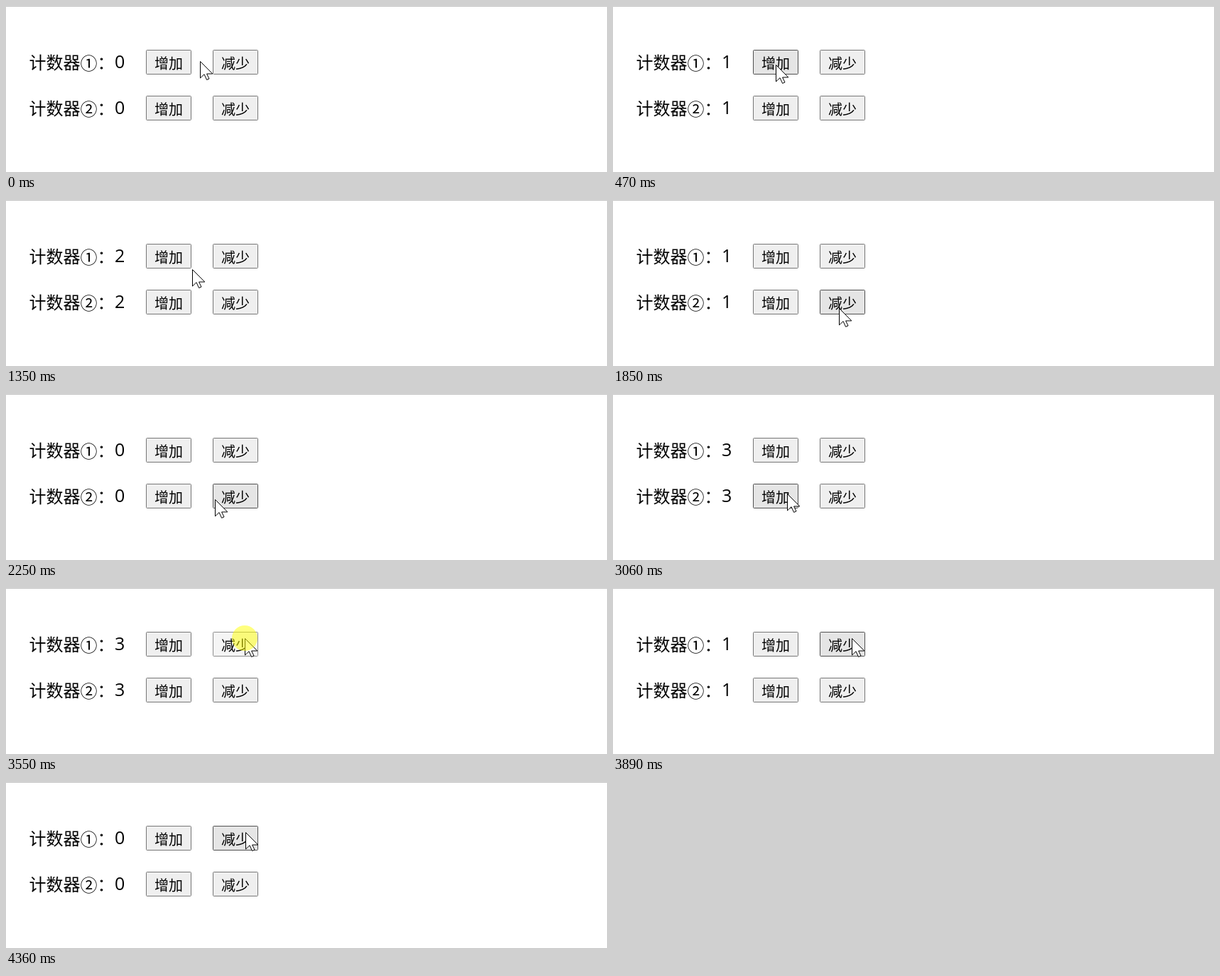
An HTML page that plays this animation: 846 px wide and 235 px high, repeating every 4490 ms.

```html
<!DOCTYPE html>
<html lang="zh-CN">
<head>
<meta charset="utf-8">
<title>计数器</title>
<style>
  html, body { margin: 0; height: 100%; overflow: hidden; background: #fff; }
  svg { display: block; width: 100%; height: 100%; }
  text { font: 350 24px "Noto Sans CJK SC", "Noto Sans CJK", "Noto Sans CJK JP", sans-serif; }
  .value { font: 25px "Open Sans", "Noto Sans", sans-serif; }
  .button text { font-size: 20px; }
  .button rect { fill: #efefef; stroke: #767676; }
  .hover rect { fill: #e5e5e5; stroke: #4f4f4f; }
  .active rect { fill: #f5f5f5; stroke: #8d8d8d; }
</style>
</head>
<body>
<svg viewBox="0 0 846 235">
  <rect width="846" height="1" fill="#c4c4c4"/>
  <g id="rows"></g>
  <g id="pointer">
    <path d="M.5 .5V24L6 18.7L9.6 26.5L13 25L9.6 18H17.8Z" fill="#fff" stroke="#000"/>
    <circle id="halo" r="18" fill="#ff0" fill-opacity=".5"/>
  </g>
</svg>
<script>
const LOOP = 4490;
const STEP = 70;           // the pointer advances once per step
const CLICK_PERIOD = 200;  // spacing of repeated clicks
const BUTTON = { w: 64, h: 35 };

// Each leg runs at constant speed from the end of the one before
const origin = { x: 273, y: 78 };
const legs = [
  { start: 70, steps: 3, x: 229, y: 83 },
  { start: 740, steps: 1, x: 228, y: 83 },
  { start: 1210, steps: 3, x: 262, y: 98 },
  { start: 1420, steps: 4, x: 318, y: 153 },
  { start: 2180, steps: 6, x: 245, y: 141 },
  { start: 3070, steps: 5, x: 336, y: 71 },
  { start: 4360, steps: 1, x: 337, y: 71 }
];

const bursts = [
  { start: 400, clicks: 1, change: 1 },
  { start: 940, clicks: 1, change: 1 },
  { start: 1780, clicks: 2, change: -1 },
  { start: 2590, clicks: 3, change: 1 },
  { start: 3550, clicks: 3, change: -1 }
];

const byId = id => document.getElementById(id);

const buttonMarkup = (x, y, label) => `
  <g class="button" data-x="${x}" data-y="${y}">
    <rect x="${x + .5}" y="${y + .5}" width="${BUTTON.w - 1}" height="${BUTTON.h - 1}" rx="1"/>
    <text x="${x + 12}" y="${y + 26.5}">${label}</text>
  </g>`;

const rowMarkup = (mark, y) => `
  <text x="32.5" y="${y + 26.5}">计数器<tspan dy="1.5">${mark}</tspan><tspan dy="-1.5">：</tspan></text>
  <text class="value" x="153" y="${y + 26}">0</text>
  ${buttonMarkup(197, y, "增加")}${buttonMarkup(291, y, "减少")}`;

byId("rows").innerHTML = rowMarkup("①", 62) + rowMarkup("②", 127);
const values = document.querySelectorAll(".value");
const buttons = document.querySelectorAll(".button");

function pointerAt(t) {
  let { x, y } = origin;
  for (const leg of legs) {
    if (t < leg.start) break;
    const progress = Math.min(1, (Math.floor((t - leg.start) / STEP) + 1) / leg.steps);
    x += (leg.x - x) * progress;
    y += (leg.y - y) * progress;
  }
  return { x: Math.round(x), y: Math.round(y) };
}

// The count changes when the button is released
function clickState(t) {
  let count = 0, pressed = false;
  for (const { start, clicks, change } of bursts)
    for (let i = 0; i < clicks; i++) {
      const age = t - start - i * CLICK_PERIOD;
      if (age >= STEP) count += change;
      else if (age >= 0) pressed = true;
    }
  return { count, pressed };
}

function draw(t) {
  const { x, y } = pointerAt(t);
  const { count, pressed } = clickState(t);

  values.forEach(value => value.textContent = count);
  buttons.forEach(button => {
    const dx = x - button.dataset.x, dy = y - button.dataset.y;
    const over = dx >= 0 && dx < BUTTON.w && dy >= 0 && dy < BUTTON.h;
    button.classList.toggle("hover", over);
    button.classList.toggle("active", over && pressed);
  });
  byId("pointer").setAttribute("transform", `translate(${x} ${y})`);
  byId("halo").setAttribute("visibility", pressed ? "visible" : "hidden");
}

const startTime = performance.now();
function tick() {
  draw((performance.now() - startTime) % LOOP);
  requestAnimationFrame(tick);
}
tick();
</script>
</body>
</html>
```
